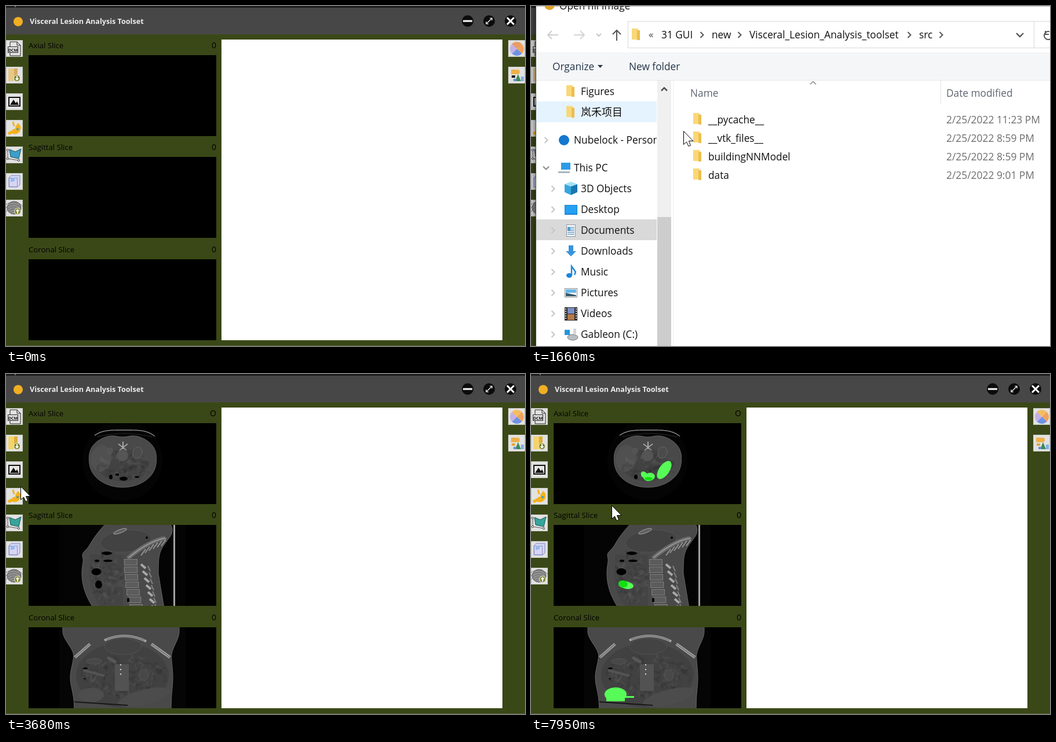
An HTML page with a canvas that plays this animation: 896 by 588 pixels, repeating every 8 s.

```html
<!DOCTYPE html>
<html lang="en">
<head>
<meta charset="utf-8">
<title>Slice viewer</title>
<style>
html, body { margin: 0; width: 100%; height: 100%; overflow: hidden; background: #3a4817; }
canvas { display: block; }
</style>
</head>
<body>
<canvas id="stage" width="896" height="588"></canvas>
<script>
const c = document.getElementById('stage').getContext('2d');
const LOOP = 8000, POINTER_IN = 390, OPEN = 1500, LISTED = 1545, ENTER = 2310, PICK = 2480, CLOSE = 2640, LOADED = 2820, SEGMENTED = 5552;
const SANS = '"Open Sans", "Noto Sans CJK SC", "Noto Sans CJK", sans-serif';

// Stops of the pointer: [time, x, y]
const stops = [[390, 750, 429], [1060, 30, 80], [1200, 12, 116], [1525, 12, 116], [1650, 263, 216],
  [1950, 395, 290], [ENTER, 395, 290], [PICK, 508, 237], [LOADED, 508, 237], [3679, 25, 194],
  [4470, 9, 185], [5360, 563, 315], [5840, 858, 289], [6100, 750, 351], [6292, 640, 336],
  [6770, 337, 325], [7938, 139, 227]];

// The screen refreshes on a coarser grid once the scans are being loaded
function snap(t) {
  const [from, step] = t < OPEN ? [390, 31] : t < 2808 ? [OPEN, 25] : [2808, 96.8];
  return from + Math.floor((t - from) / step) * step;
}
function pointerAt(t) {
  const i = stops.findIndex(s => s[0] > t);
  if (i < 0) return stops.at(-1).slice(1);
  const [t0, x0, y0] = stops[Math.max(0, i - 1)], [t1, x1, y1] = stops[i];
  const f = t1 > t0 ? (t - t0) / (t1 - t0) : 0;
  return [Math.round(x0 + (x1 - x0) * f), Math.round(y0 + (y1 - y0) * f)];
}

// Drawing helpers
function rect(x, y, w, h, fill) { c.fillStyle = fill; c.fillRect(x, y, w, h); }
function frame(x, y, w, h, color) { c.strokeStyle = color; c.lineWidth = 1; c.strokeRect(x + .5, y + .5, w - 1, h - 1); }
function paint(fill, stroke, width = 1) {
  if (fill) { c.fillStyle = fill; c.fill(); }
  if (stroke) { c.strokeStyle = stroke; c.lineWidth = width; c.stroke(); }
}
function oval(x, y, rx, ry, fill, stroke, turn = 0) {
  c.beginPath(); c.ellipse(x, y, rx, ry, turn, 0, 7); paint(fill, stroke);
}
function arc(x, y, r, a, b, color, width) { c.beginPath(); c.arc(x, y, r, a, b); paint(null, color, width); }
function poly(p, fill, stroke, width) {
  c.beginPath();
  for (let i = 0; i < p.length; i += 2) c.lineTo(p[i], p[i + 1]);
  if (fill) c.closePath();
  paint(fill, stroke, width);
}
function line(x0, y0, x1, y1, color, width) { poly([x0, y0, x1, y1], null, color, width); }
function curve(x0, x1, f, color, width) {
  c.beginPath();
  for (let x = x0; x <= x1; x++) c.lineTo(x, f(x));
  paint(null, color, width);
}
// Region between two edges given as x = f(y)
function between(y0, y1, left, right, fill, stroke) {
  c.beginPath();
  for (let y = y0; y <= y1; y += 2) c.lineTo(left(y), y);
  for (let y = y1; y >= y0; y -= 2) c.lineTo(right(y), y);
  c.closePath(); paint(fill, stroke);
}
function text(s, x, y, size = 17.3, fill = '#111', align = 'left', weight = 400) {
  c.font = `${weight} ${size}px ${SANS}`; c.textAlign = align; c.fillStyle = fill; c.fillText(s, x, y);
}
function at(x, y, draw) { c.save(); c.translate(x, y); draw(); c.restore(); }
function clipped(x, y, w, h, draw) { c.save(); c.beginPath(); c.rect(x, y, w, h); c.clip(); draw(); c.restore(); }

const bump = (d, width) => Math.exp(-d * d / width / width);
const ramp = v => { v = Math.min(1, Math.max(0, v)); return v * v * (3 - 2 * v); };

// Toolbar icons, each in a 29 px tile
function badge(x, y, turn) {
  oval(x, y, 5.5, 5.5, '#7e8630', '#e8e8dc');
  at(x, y, () => { c.rotate(turn); rect(-1, -4, 2, 5, '#fff'); poly([-3.5, 0, 3.5, 0, 0, 4], '#fff'); });
}
const leftIcons = [
  () => {
    poly([7, 3, 19, 3, 25, 9, 25, 27, 7, 27], '#e3e3e3', '#222'); poly([19, 3, 19, 9, 25, 9], null, '#222');
    rect(3, 11, 18, 11, '#e3e3e3'); frame(3, 11, 18, 11, '#222');
    text('DCM', 12, 19.5, 7, '#111', 'center', 700);
  },
  late => {
    rect(4, 3, 10, 22, late ? '#f4d36c' : '#e9c886'); rect(14, 3, 6, 18, late ? '#dcae3c' : '#d6ad67');
    badge(19, 20, 0);
  },
  () => {
    rect(4, 6, 21, 17, '#111'); rect(6, 8, 17, 13, '#e6e6e6');
    poly([7, 20, 13, 11, 17, 17, 19, 14, 22, 20], '#111');
  },
  () => {
    line(12, 3, 14, 11, '#f5b21c', 3); arc(15, 14, 6, -1, 2.4, '#f5b21c', 9); line(12, 20, 4, 24, '#f5b21c', 5);
    oval(20, 16, 2, 2, '#3b9fb8');
  },
  late => {
    poly([6, 5, 16, 9, 26, 4, 22, 21, 8, 18], late ? '#35a59b' : '#3a9fca', '#24525f');
    poly([3, 6, 3, 21, 22, 24], null, '#555');
    for (const [x, y] of [[3, 6], [3, 21], [22, 24]]) oval(x, y, 1.6, 1.6, '#fff', '#444');
  },
  () => {
    poly([5, 8, 9, 4, 24, 4, 24, 20, 20, 24, 5, 24], '#d3d6f2', '#7d86c6');
    frame(5, 8, 15, 16, '#8a92d0'); rect(8, 8, 7, 7, '#96b8ee'); rect(12, 14, 7, 7, '#ddd3ef');
  },
  () => {
    oval(14, 14, 12, 11, '#929292', '#555');
    for (let r = 5; r < 23; r += 4) arc(13, 25, r, 3.5, 5.6, '#5e5e5e', .8);
    badge(20, 20, Math.PI);
  }
];
const rightIcons = [
  late => ['#f0a35c', '#6d93e4', '#c3b0e6', late ? '#f5bd62' : '#e89c66'].forEach((color, i) => {
    c.beginPath(); c.moveTo(15, 15); c.arc(15, 15, 12, i * 1.57 - .8, i * 1.57 + .8); paint(color);
  }),
  late => {
    rect(5, 5, 9, 8, '#eeb14a'); oval(16, 9, 4, 4, '#eeb14a'); rect(6, 15, 6, 4, late ? '#e0a545' : '#111');
    poly([12, 25, 17, 13, 22, 25], '#3c8c54'); rect(22, 17, 5, 8, '#83aee8'); rect(9, 21, 5, 4, '#6590d6');
  }
];

// Scans
const GREEN = '#57fb57', DEEP = '#10e010', BODY = '#494949', SKIN = '#646464', BONE = '#a8a8a8';

// Soft random marks inside an ellipse
function tissue(n, x, y, rx, ry, seed) {
  const rnd = () => (seed = seed * 16807 % 2147483647) / 2147483647;
  for (let i = 0; i < n; i++) {
    const a = rnd() * 6.28, r = Math.sqrt(rnd());
    oval(x + rx * r * Math.cos(a), y + ry * r * Math.sin(a), 2 + rnd() * 6, 1 + rnd() * 2,
      i % 2 ? 'rgba(115,115,115,.16)' : 'rgba(30,30,30,.16)', null, rnd() * 3);
  }
}
function axial(segmented) {
  oval(201, 150, 69, 69, '#040404');
  curve(153, 257, x => 97 + 10 * ((x - 204) / 52) ** 4, '#8c8c8c', 1.4);
  curve(158, 252, x => 103 + 6 * ((x - 204) / 48) ** 2, '#2b2b2b');
  c.beginPath();
  for (let a = 0; a < 6.28; a += .06) {
    const s = Math.sin(a), x = 58 * Math.cos(a) * (1 - .06 * s);
    c.lineTo(201.5 + x, 150 + 46 * Math.sign(s) * Math.abs(s) ** .85 + (s < 0 ? 5 * bump(x, 15) : 0));
  }
  c.closePath(); paint(BODY, SKIN);
  oval(202, 158, 44, 28, '#424242');
  oval(164, 146, 18, 23, '#505050', null, .2);
  tissue(70, 202, 160, 45, 23, 17);
  oval(201, 141, 10, 10, '#555');
  oval(227, 136, 8, 10, '#4b4b4b', '#666', .3); oval(180, 133, 4, 5, '#525252', '#5e5e5e');
  line(202, 117, 202, 130, BONE, 2);
  for (const side of [-1, 1]) { line(202, 127, 202 + 8 * side, 121, BONE, 1.6); line(202, 127, 202 + 6 * side, 132, BONE, 1.6); }
  oval(181, 178, 3, 4, '#000'); oval(203, 181, 7, 3.5, '#000'); oval(192, 174, 3, 2, '#000'); oval(226, 178, 4, 1.5, '#000');
  if (!segmented) return;
  oval(195, 174, 6, 5, GREEN, null, .8); oval(204, 178, 10, 7, GREEN, null, -.2); oval(203, 181, 7, 3, DEEP);
  oval(230, 166, 9, 18, GREEN, null, .6);
}
function sagittal(segmented) {
  rect(92, 261, 218, 141, '#040404'); rect(289, 261, 3, 141, '#a2a2a2');
  const front = y => 131 + (y - 345) ** 2 / 180 - 5 * bump(y - 311, 8);
  const back = y => 263 + 24 * bump(y - 270, 27) + Math.max(0, y - 345) / 6;
  between(259, 405, front, back, BODY, SKIN);
  oval(207, 289, 44, 19, '#424242', '#535353', -.1);
  between(312, 405, y => front(y) + 13, () => 202, '#444');
  tissue(80, 175, 352, 30, 44, 91);
  oval(197, 272, 12, 3, '#606060', BONE, -.35);
  for (let i = 0; i < 7; i++) {
    const x = 204 + i * i * .25, y = 320 + i * 13;
    rect(x, y, 23, 11, '#5c5c5c'); frame(x, y, 23, 11, '#808080');
    line(233 + i * 3, 329 + i * 12, 241 + i * 3, 336 + i * 12, BONE, 4);
    line(245 + i * 2, 332 + i * 11, 249 + i * 2, 341 + i * 11, '#808080', 2);
  }
  const neck = x => 284 + 35 * ((277 - x) / 67) ** 1.6;
  curve(210, 275, neck, '#6c6c6c', 7); curve(212, 277, neck, BONE, 1.2);
  for (let x = 233; x < 272; x += 7) line(x, neck(x) + 12, x + 8, neck(x) + 1, '#909090', 2);
  oval(174, 310, 9, 3, '#000'); oval(176, 323, 8, 2, '#000'); oval(157, 323, 4, 2, '#000');
  oval(156, 342, 8.5, 6, '#000'); oval(160, 364, 6, 7, '#000'); oval(243, 283, 2, 2, '#000'); oval(211, 391, 2, 4, '#000');
  if (!segmented) return;
  oval(164, 365, 13, 6.5, GREEN, null, .2); oval(159, 363, 8, 6, DEEP, null, .2);
}
function coronal(segmented) {
  rect(92, 438, 218, 140, '#050505');
  const taper = y => ramp((y - 445) / 45), left = y => 98 + 20 * taper(y) - 7 * bump(y - 525, 28);
  between(436, 580, left, y => 299 - 14 * taper(y) + 3 * bump(y - 525, 28), BODY, SKIN);
  oval(201, 521, 80, 56, '#414141');
  oval(202, 471, 32, 14, '#434343', '#535353');
  tissue(120, 202, 524, 73, 42, 53);
  oval(147, 555, 22, 12, '#4d4d4d'); oval(238, 559, 46, 13, '#4c4c4c', null, -.25);
  rect(188, 502, 24, 46, '#525252');
  oval(152, 497, 13, 5, '#484848', '#565656'); oval(238, 521, 8, 9, '#484848', '#585858');
  line(133, 512, 170, 522, '#545454', 4); line(175, 490, 190, 499, '#585858', 5);
  const ribs = x => 453 + .0065 * (x - 204) ** 2;
  curve(170, 242, ribs, BONE, 4); curve(173, 239, ribs, '#777', 2);
  for (const [x0, x1] of [[119, 145], [283, 251]]) { line(x0, 490, x1, 467, BONE, 5); line(x0, 490, x1, 467, '#777', 2); }
  for (let y = 503; y < 520; y += 8) oval(198, y, 1.2, 1.2, '#d0d0d0');
  oval(137, 509, 4, 1.5, '#000'); oval(136, 527, 2, 1, '#000');
  line(118, 567, 210, 573, '#171717', 2);
  if (!segmented) return;
  oval(146, 554, 19, 12, GREEN); rect(130, 558, 32, 8, GREEN); rect(160, 557, 18, 3, GREEN);
}

function mainWindow(loaded, segmented, late) {
  rect(0, 0, 896, 588, '#3a4817');
  rect(0, 0, 896, 49, '#484748'); rect(0, 0, 896, 3, '#1d1c1f'); rect(15, 0, 2, 2, '#777');
  rect(0, 587, 896, 1, '#56613a');
  oval(21, 27, 8, 8, '#f0ae22');
  text('Visceral Lesion Analysis Toolset', 41, 31, 12.6, '#ececec', 'left', 700);
  for (const x of [797, 834, 871]) oval(x, 26, 10, 10, '#0b0b0b');
  rect(789, 24.5, 16, 3, '#fff');
  line(829, 31, 839, 21, '#fff', 1.2);
  for (const s of [-1, 1]) {
    poly([834 + s, 26 - 5 * s, 834 + 5 * s, 26 - 5 * s, 834 + 5 * s, 26 - s], null, '#fff', 1.2);
    line(865, 26 - 6 * s, 877, 26 + 6 * s, '#fff', 3);
  }
  [[0, leftIcons], [867, rightIcons]].forEach(([x, icons]) => icons.forEach((icon, i) => at(x, 59 + i * 46, () => {
    rect(0, 0, 29, 29, '#e2e2e1'); frame(0, 0, 29, 29, '#c9c9c6'); icon(late);
  })));
  [['Axial', axial], ['Sagittal', sagittal], ['Coronal', coronal]].forEach(([name, scan], i) => {
    const y = Math.floor(85 + i * 176.5);
    text(name + ' Slice', 39, y - 12, 13.2, '#000');
    text(loaded && !i ? 'O' : '0', 363, y - 12, 14, '#000', 'right');
    rect(39, y, 324, 140, '#000');
    if (loaded) clipped(39, y, 324, 140, () => scan(segmented));
  });
  rect(372, 58, 485, 520, '#fff');
}

// File dialog
function folder(x, y) { rect(x, y - 10, 11, 19, '#f9d878'); rect(x + 9, y - 7, 5, 17, '#edbd4e'); }
function chevron(x, y, color, turn = 0, size = 5, width = 2) {
  at(x, y, () => { c.rotate(turn); poly([-size / 2, -size, size / 2, 0, -size / 2, size], null, color, width); });
}
const DOWN = Math.PI / 2, UP = -DOWN;
function arrow(x, y, color, turn) {
  at(x, y, () => { c.rotate(turn); line(-9, 0, 9, 0, color, 2); poly([2, -7, 9, 0, 2, 7], null, color, 2); });
}
const places = [
  ['3D Objects', () => { poly([0, -8, 11, -4, 11, 11, 0, 6], '#35a7dd'); poly([22, -8, 11, -4, 11, 11, 22, 6], '#1976b0'); poly([0, -8, 11, -12, 22, -8, 11, -4], '#a2e0f4'); }],
  ['Desktop', () => { rect(0, -8, 22, 17, '#1680d2'); rect(1, -7, 20, 14, '#24a1f2'); }],
  ['Documents', () => { rect(3, -10, 16, 21, '#fff'); frame(3, -10, 16, 21, '#8795a2'); for (let y = -6; y < 8; y += 3) rect(5, y, 12, 1.3, '#5a90b8'); rect(5, -6, 5, 6, '#4e9ed4'); }],
  ['Downloads', () => { rect(7, -10, 8, 11, '#3793dd'); poly([2, 0, 20, 0, 11, 9], '#3793dd'); }],
  ['Music', () => { oval(8, 6, 5, 4, '#1786d8'); poly([12, 6, 12, -10, 19, 0, 17, 5], null, '#1786d8', 2.4); }],
  ['Pictures', () => { rect(0, -8, 22, 16, '#fff'); frame(0, -8, 22, 16, '#8a8a8a'); rect(2, -6, 18, 6, '#67b7e8'); poly([2, 6, 2, 0, 20, 4, 20, 6], '#35586b'); }],
  ['Videos', () => { rect(0, -11, 22, 23, '#2b2b2b'); rect(5, -10, 12, 10, '#7b8fc7'); rect(5, 1, 12, 10, '#b57948'); for (let y = -9; y < 11; y += 4) { rect(1, y, 2, 2, '#ddd'); rect(19, y, 2, 2, '#ddd'); } }],
  ['Gableon (C:)', () => { oval(14, 5, 9, 5, '#b9bec2', '#777'); rect(0, -8, 9, 9, '#2196dd'); rect(15, -10, 5, 9, '#d5d5d5'); }]
];
const TOOL = 'Visceral_Lesion_Analysis_toolset';
const pages = [
  { crumbs: { '31 GUI': 225, new: 312, [TOOL]: 377, src: 670 }, end: 708,
    files: [['__pycache__', '2/25/2022 11:23 PM'], ['__vtk_files__', '2/25/2022 8:59 PM'], ['buildingNNModel', '2/25/2022 8:59 PM'], ['data', '2/25/2022 9:01 PM']] },
  { crumbs: { new: 225, [TOOL]: 290, src: 583, data: 638 }, end: 689,
    files: [['1 original data_CBCT', '2/25/2022 8:59 PM'], ['11412319_0000.nii.gz', '9/8/2021 3:09 PM']] }
];

function navPane(inside, hover) {
  clipped(9, 129, 208, 459, () => {
    if (hover) rect(9, 165, 208, 36, '#e5f3ff');
    rect(9, 369, 208, 36, '#d9d9d9');
    folder(61, 147); text('Figures', 86, 154);
    folder(61, 183); text('岚禾项目', 86, 190, 18);
    oval(57, 232, 9, 9, '#1478d0'); text('Nubelock - Person', 74, 238);
    rect(52, 271, 16, 12, '#2d9be6'); rect(47, 286, 20, 3, '#a9b4bd'); text('This PC', 74, 286);
    places.forEach(([name, icon], i) => {
      const y = 316 + i * 36;
      at(58, y, icon); text(name, 86, y + 6);
      if (inside) chevron(38, y, '#c4c4c4');
    });
    if (inside) { chevron(26, 232, '#c4c4c4'); chevron(26, 280, '#8a8a8a', DOWN); }
  });
  rect(218, 129, 24, 459, '#f0f0f0'); rect(218, 365, 24, 223, '#cdcdcd');
  chevron(230, 144, '#505050', UP, 5, 2.5);
  rect(245, 129, 1, 459, '#f0f0f0');
}

function dialog(t, [px, py]) {
  const shade = c.createLinearGradient(0, 0, 9, 0);
  shade.addColorStop(0, 'rgba(0,0,0,.08)'); shade.addColorStop(1, 'rgba(0,0,0,.4)');
  rect(0, 0, 9, 588, shade);
  rect(9, 0, 887, 588, '#fff'); rect(9, 0, 887, 1, '#b5b5b5'); rect(8, 0, 1, 588, '#4c5340');
  oval(32, -2, 9, 9, '#dfa22b'); text('Open nii Image', 49, 6);
  if (t < LISTED) return;

  const second = t >= ENTER, { crumbs, end, files } = pages[+second];
  arrow(38, 50, second ? '#444' : '#cfcfcf', Math.PI); arrow(83, 50, '#d3d3d3', 0); arrow(148, 51, '#555', UP);
  chevron(117, 50, second ? '#666' : '#c5c5c5', DOWN, 4);
  frame(167, 26, 702, 47, '#d9d9d9'); frame(868, 26, 60, 47, '#d9d9d9');
  folder(174, 49); text('«', 203, 55, 17, '#444');
  Object.entries(crumbs).forEach(([name, x], i) => {
    text(name, x, 56);
    if (i) chevron(x - 17, 50, '#555');
  });
  chevron(end, 50, '#555'); chevron(844, 50, '#555', DOWN, 6, 2.4);
  arc(893, 51, 7, 1, 5, '#555', 2); poly([888, 43, 888, 49, 894, 49], null, '#555', 2);

  rect(9, 80, 887, 48, '#f5f6f7'); rect(9, 128, 887, 1, '#e6e7e8');
  text('Organize', 37, 111, 17.3, '#25364a'); poly([115, 102, 124, 102, 119.5, 107], '#25364a');
  text('New folder', 169, 111, 17.3, '#25364a');
  navPane(!second, t < 1750);

  text('Name', 275, 157, 17.3, '#5d656e'); text('Date modified', 717, 157, 17.3, '#5d656e');
  rect(707, 129, 1, 41, '#e3e3e3'); chevron(487, 133, '#777', UP, 5, 1.2);
  const hovered = px > 269 ? Math.floor((py - 180) / 32) : -1;
  const chosen = t >= (second ? PICK : 2100);
  files.forEach(([name, date], i) => {
    const y = 197 + i * 32;
    if (i === hovered) {
      rect(270, y - 18, 626, 33, chosen ? '#cce8ff' : '#e5f3ff');
      if (chosen) frame(270, y - 18, 640, 33, '#99d1ff');
    }
    if (name.endsWith('gz')) {
      oval(288, y - 2, 11, 11, '#777'); rect(277, y, 22, 10, '#2c2d31'); text('GZ', 288, y + 8, 8.5, '#fff', 'center', 700);
    } else folder(280, y - 2);
    text(name, 306, y + 6); text(date, 717, y + 6, 17.4, '#6d6d6d');
  });
}

function pointer([x, y]) {
  at(x + .5, y + .5, () => poly([0, 0, 0, 23, 5, 18.5, 8.5, 26, 12, 24.5, 9, 17, 16.5, 17], '#fff', '#000'));
}

function draw(t) {
  const tip = pointerAt(snap(t));
  mainWindow(t >= LOADED, t >= SEGMENTED, t >= CLOSE);
  if (t >= OPEN && t < CLOSE) dialog(t, tip);
  if (t >= POINTER_IN) pointer(tip);
}

let start;
function tick(now) {
  start ??= now;
  draw((now - start) % LOOP);
  requestAnimationFrame(tick);
}
requestAnimationFrame(tick);
</script>
</body>
</html>
```
